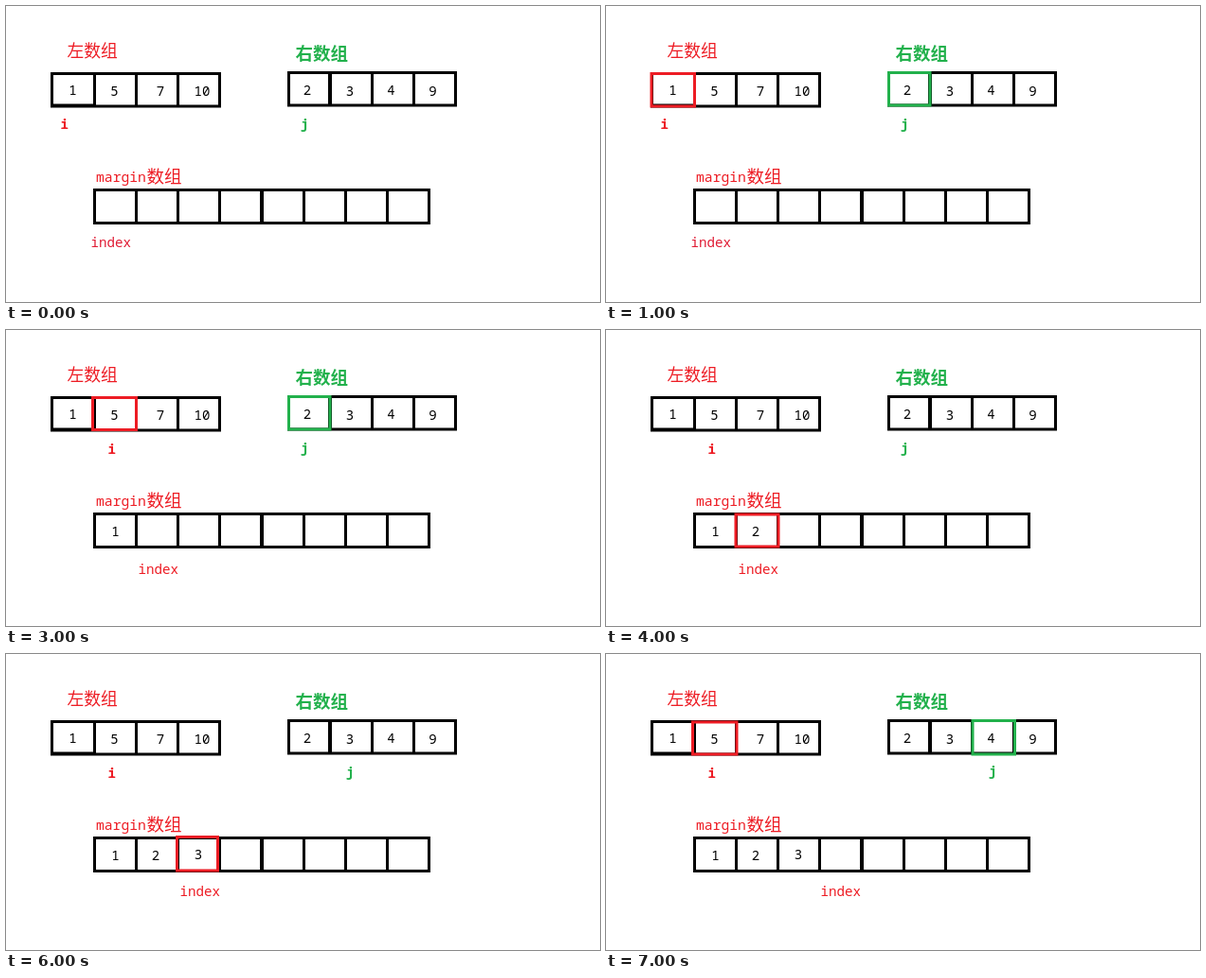
Recreate the animation shown at these times as an HTML page. Size 627 by 313 pixels, loop 8 s.

```html
<!DOCTYPE html>
<html lang="zh-CN">
<head>
<meta charset="utf-8">
<title>Merging two sorted arrays</title>
<style>
  html, body { margin: 0; width: 100%; height: 100%; overflow: hidden; background: #fff; }
  svg { display: block; width: 627px; height: 313px; }
  text { font: 14.2px "Noto Sans Mono", monospace; }
  .cjk { font: 17.8px "Noto Sans CJK SC", "Noto Sans CJK", sans-serif; }
  .bold { font-weight: 700; }
  .num text { text-anchor: middle; font-size: 14px; }
  .red { fill: #ed1c24; }
  .green { fill: #22b14c; }
  .grid { fill: none; stroke: #000; stroke-width: 3; }
  .thick { stroke-width: 4; }
  .box { fill: none; stroke-width: 3; }
  .box.r { stroke: #ed1c24; }
  .box.g { stroke: #22b14c; }

  .i, .j, .index, .box, .put { animation: 8s step-end infinite; }
  .i { animation-name: i; }
  .j { animation-name: j; }
  .index { animation-name: index; }
  .box { opacity: 0; animation-name: flash; animation-delay: calc(var(--at) * 1s - 8s); }
  .put1 { animation-name: put1; }
  .put2 { animation-name: put2; }
  .put3 { animation-name: put3; }

  @keyframes flash { 0% { opacity: 1 } 12.5%, 100% { opacity: 0 } }
  @keyframes put1 { 0% { opacity: 0 } 25%, 100% { opacity: 1 } }
  @keyframes put2 { 0% { opacity: 0 } 50%, 100% { opacity: 1 } }
  @keyframes put3 { 0% { opacity: 0 } 75%, 100% { opacity: 1 } }
  @keyframes i { 0% { transform: none } 37.5%, 100% { transform: translate(50px, 1px) } }
  @keyframes j {
    0% { transform: none }
    62.5% { transform: translate(48px, 0) }
    87.5%, 100% { transform: translate(93px, -1px) }
  }
  @keyframes index {
    0% { transform: none; fill: #e01c35 }
    37.5% { transform: translate(50px, 3px); fill: #ed1c24 }
    62.5% { transform: translate(94px, 1px); fill: #ed1c24 }
    87.5%, 100% { transform: translate(137px, 1px); fill: #ed1c24 }
  }
</style>
</head>
<body>
<svg viewBox="0 0 627 313">
  <g class="grid">
    <path d="M48.5 71.5H225.5V106H48.5ZM93.5 71.5V106M137.5 71.5V106M181.5 71.5V106M48.5 105H93.5"/>
    <path d="M298.5 70.5H474.5V105H298.5ZM386.5 70.5V105M430.5 70.5V105"/>
    <path d="M93.5 194.5H446.5V229.5H93.5ZM137.5 194.5V229.5M181.5 194.5V229.5M225.5 194.5V229.5M314.5 194.5V229.5M358.5 194.5V229.5M402.5 194.5V229.5"/>
    <path class="thick" d="M342 70.5V105M270 194.5V229.5"/>
  </g>

  <text class="cjk red" x="64.5" y="54.3">左数组</text>
  <text class="cjk bold green" x="305.5" y="56.8" style="font-size:18.5px">右数组</text>
  <text class="red" x="95" y="185.5" style="font-size:14.7px">margin</text>
  <text class="cjk red" x="148.5" y="186.5" style="font-size:18.5px">数组</text>

  <g class="num">
    <text x="70.5" y="94">1</text>
    <text x="114.5" y="95">5</text>
    <text x="163" y="95">7</text>
    <text x="207" y="95">10</text>
    <text x="318" y="93.5">2</text>
    <text x="363" y="95">3</text>
    <text x="406.5" y="94">4</text>
    <text x="450.5" y="95">9</text>
    <text class="put put1" x="115.5" y="217.5">1</text>
    <text class="put put2" x="158" y="217.5">2</text>
    <text class="put put3" x="203" y="217">3</text>
  </g>

  <text class="i red bold" x="57.5" y="130">i</text>
  <text class="j green bold" x="311" y="130">j</text>
  <text class="index" x="89.5" y="255">index</text>

  <rect class="box r" style="--at:1" x="48" y="71.5" width="45.5" height="34.5"/>
  <rect class="box g" style="--at:1" x="298.5" y="70.5" width="43.5" height="34.5"/>
  <rect class="box r" style="--at:2" x="93.5" y="194" width="45" height="35"/>
  <rect class="box r" style="--at:3" x="91.5" y="71.5" width="46" height="34"/>
  <rect class="box g" style="--at:3" x="298.5" y="70.5" width="43.5" height="34.5"/>
  <rect class="box r" style="--at:4" x="137" y="195" width="45" height="34"/>
  <rect class="box r" style="--at:5" x="91.5" y="71.5" width="46" height="33.5"/>
  <rect class="box g" style="--at:5" x="340.5" y="71" width="48.5" height="34.5"/>
  <rect class="box r" style="--at:6" x="180.5" y="193.5" width="43" height="35.5"/>
  <rect class="box r" style="--at:7" x="91.5" y="72" width="46.5" height="34"/>
  <rect class="box g" style="--at:7" x="387" y="70.5" width="44.5" height="35.5"/>
</svg>
</body>
</html>
```
